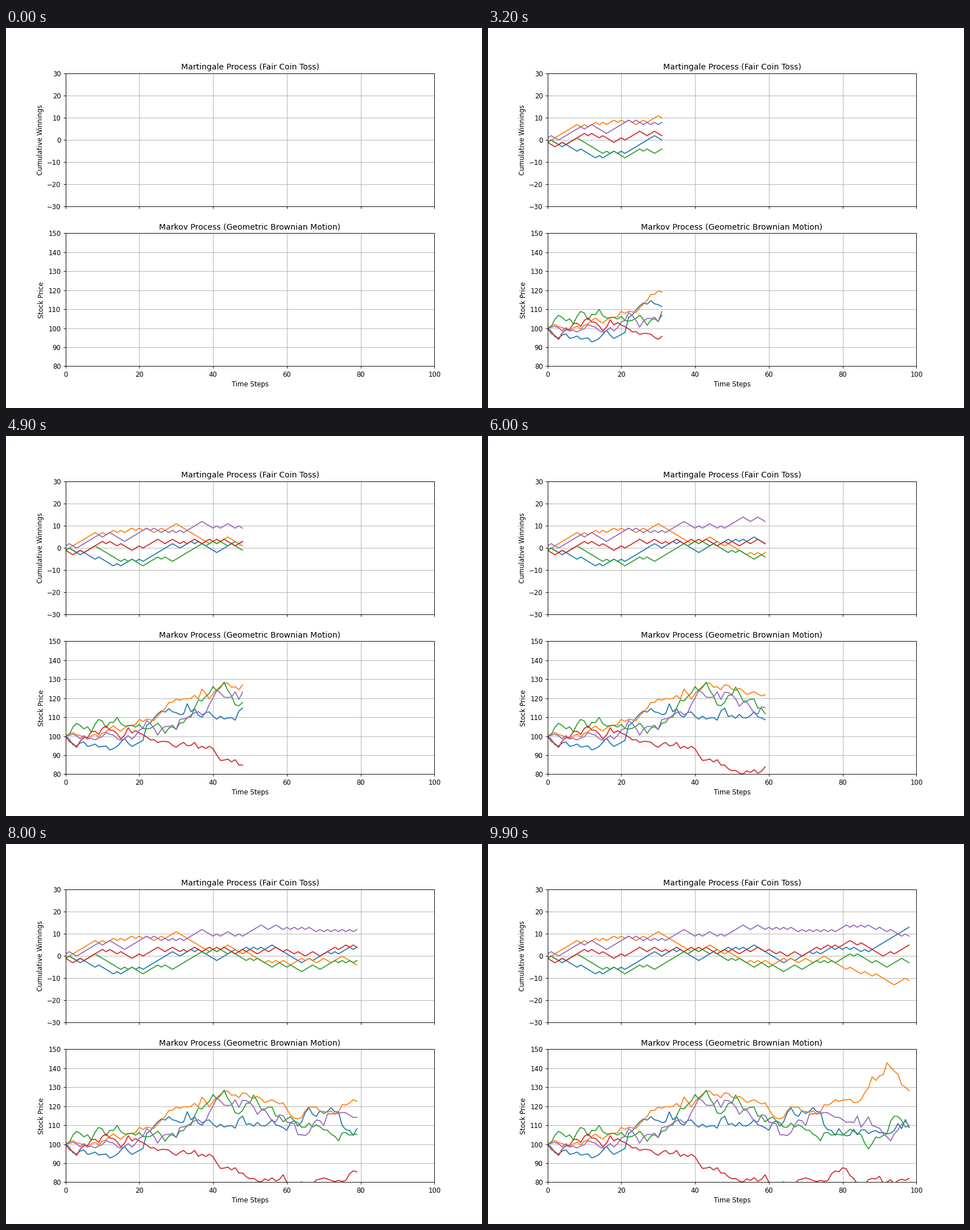
Animation, 837 px wide and 669 px high, one loop 10000 ms. Source, as a matplotlib script:

```python
import numpy as np
import matplotlib.pyplot as plt
from matplotlib.animation import FuncAnimation

W, H, DPI = 837, 669, 83.7
STEPS, PATHS = 100, 5
MU, SIGMA, DT, S0 = 0.1, 0.2, 0.01, 100

np.random.seed(42)

# Fair coin toss: running sum of +1 / -1 bets
winnings = np.cumsum(np.random.choice([-1, 1], size=(PATHS, STEPS)), axis=1)

# Geometric Brownian motion
z = np.random.normal(size=(PATHS, STEPS - 1))
log_steps = (MU - 0.5 * SIGMA**2) * DT + SIGMA * np.sqrt(DT) * z
prices = np.full((PATHS, STEPS), float(S0))
prices[:, 1:] *= np.exp(np.cumsum(log_steps, axis=1))

fig, (top, bottom) = plt.subplots(
    2, 1, sharex=True, dpi=DPI,
    figsize=((W + 0.01) / DPI, (H + 0.01) / DPI))


def setup(ax, title, ylabel, ylim):
    ax.set_title(title)
    ax.set_ylabel(ylabel)
    ax.set_xlim(0, STEPS)
    ax.set_ylim(*ylim)
    ax.grid(True)
    return [ax.plot([], [])[0] for _ in range(PATHS)]


coin_lines = setup(top, "Martingale Process (Fair Coin Toss)",
                   "Cumulative Winnings", (-30, 30))
price_lines = setup(bottom, "Markov Process (Geometric Brownian Motion)",
                    "Stock Price", (80, 150))
bottom.set_xlabel("Time Steps")

lines = coin_lines + price_lines
series = np.vstack([winnings, prices])
t = np.arange(STEPS)


def update(n):
    for line, y in zip(lines, series):
        line.set_data(t[:n], y[:n])
    return lines


anim = FuncAnimation(fig, update, frames=STEPS, init_func=lambda: update(0),
                     interval=100, repeat=True, repeat_delay=0)
plt.show()
```
